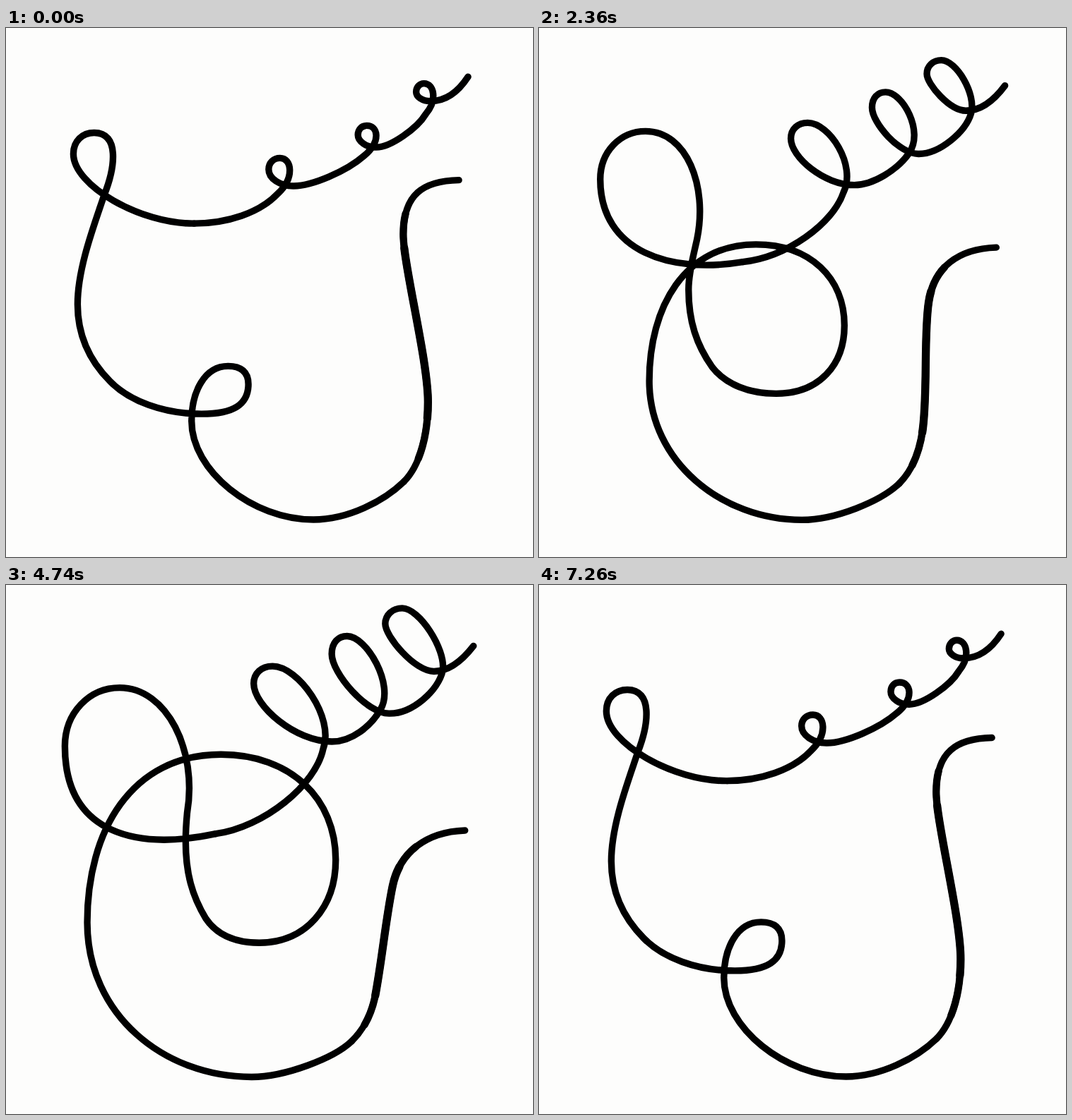
Recreate the animation shown at these times as an HTML page without scripts. Size 746 px wide and 750 px high, loop 7.36 s.

```html
<!DOCTYPE html>
<html lang="en">
<head>
<meta charset="utf-8">
<title>Looping line</title>
<style>
  html, body { margin: 0; width: 100%; height: 100%; overflow: hidden; background: #fdfdfc; }
  svg { display: block; width: 100%; height: 100%; }

  path {
    fill: none;
    stroke: #000;
    stroke-width: 9.4;
    stroke-linecap: round;
    stroke-linejoin: round;
    animation: 7360ms cubic-bezier(.635, 0, .365, 1) -7020ms infinite;
  }
  .curl { animation-name: curl; }
  .body { animation-name: body; }
  .spine { animation-name: spine; }

  /* the right-hand stroke swells towards its middle */
  .swell { stroke-width: 10.3; stroke-dasharray: 72 100; stroke-dashoffset: -8; }
  .core { stroke-width: 11.3; stroke-dasharray: 50 100; stroke-dashoffset: -20; }

  @keyframes curl {
    0%, 100% { d: path("M654 69 C641 89 624 104 600 103.5 C590 103.5 581 98 581 91 C581 84 586 79 592 79 C606 79 611 102 594 122 C582 142 544 169 524 169 C510 169.5 498.5 161 498.5 152 C498.5 144 504 139 511 139 C526 139 532 160 507 181 C482 203 432 224.5 406 224 C388 224 372 214 372 201 C372 191.5 379 185 388 185 C404 185 409 212 384 235 C358 262 313 276.5 266 276.5"); }
    47.28%, 51.63% { d: path("M662 87 C645 109 627 123 606 123 C578 123 535.5 72 535.5 54 C535.5 41 546 31.5 560 31.5 C584 31.5 623 90 619 121 C613 150 576 183 543 182.5 C511 183 460 124 460 96 C460 80 469 70.5 482 70.5 C510 70.5 551 141 531 176 C518 200 491 222 463 222 C410 222 350 170 350 138 C350 123 361 113 377 113 C414 113 467 187 451 232 C441 284 367 345 298 355"); }
  }
  @keyframes body {
    0%, 100% { d: path("M266 276.5 C190 277 95.5 222 95.5 178 C95.5 160 108 148.5 124.5 148.5 C160 148.5 154 196 138 236 C124 278 100 340 100 392 C100 435 117 472 146 501 C173 529 222 547.5 276 547.5 C322 547.5 342 534 342 506 C342 489 332 481.5 314.5 481.5 C282 481.5 264 517 264 558 C264 628 350 697 436 697 C485 697 535 671 564 643"); }
    47.28%, 51.63% { d: path("M298 355 C187 379 83 359 83 230 C83 182 118 145.5 162 145.5 C230 145.5 275 236 260 326 C259 340 259 350 259 362 C259 408 268 440 287 472 C303 496 330 506 361 506 C428 506 470.5 454 470.5 386 C470.5 298 406 233 304 233 C174 233 110.5 344 110.5 476 C110.5 609 220 697.5 345 697.5 C392 697.5 462 671 487 647"); }
  }
  @keyframes spine {
    0%, 100% { d: path("M564 643 C586 621 598 578 598 530 C598 470 562.5 335 562.5 291 C562.5 235 590 215.5 641 214.5"); }
    47.28%, 51.63% { d: path("M487 647 C501 633 513 616 520 586 C530 536 537 476 547 430 C557 384 594 354 650 352"); }
  }
</style>
</head>
<body>
<svg viewBox="0 0 746 750" aria-hidden="true">
  <path class="curl"/>
  <path class="body"/>
  <path class="spine"/>
  <path class="spine swell" pathLength="100"/>
  <path class="spine core" pathLength="100"/>
</svg>
</body>
</html>
```
